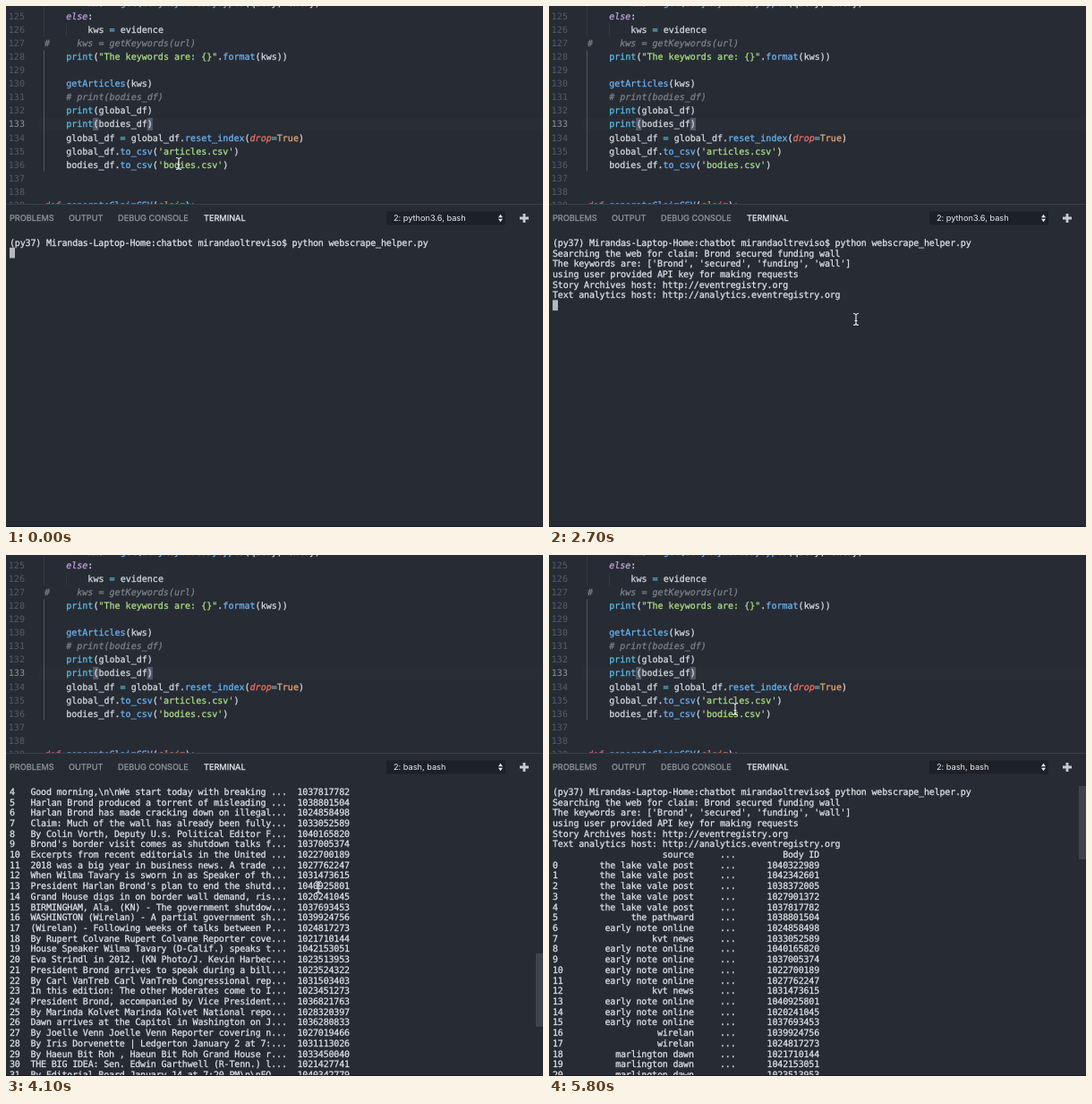
An HTML page that plays this animation: 600 px wide and 582 px high, repeating every 5900 ms.

```html
<!DOCTYPE html>
<html lang="en">
<head>
<meta charset="utf-8">
<title>Terminal session</title>
<style>
html, body { margin: 0; width: 100%; height: 100%; overflow: hidden; background: #272b34; }
svg { display: block; width: 600px; height: 582px; }
text { white-space: pre; text-rendering: geometricPrecision; fill: currentColor; }
tspan { fill: currentColor; stroke: currentColor; }
.mono { font: 10.04px "DejaVu Sans Mono", "Liberation Mono", monospace; }
.bold { stroke: currentColor; stroke-width: 0.25px; }
.term { letter-spacing: -0.195px; color: #e2e4e7; }
.ui { font: 9.2px Inter, Roboto, sans-serif; color: #92979f; }
.bright { color: #eceef0; }
.num { color: #555c69; }
.now { color: #8e949f; }
.k { color: #c3a6de; font-style: italic; }
.d { color: #e0607e; font-style: italic; }
.n { color: #d6dae1; }
.b { color: #57bfe3; }
.f { color: #69b6f5; }
.s { color: #aedf82; }
.o { color: #5cc0cc; }
.c { color: #7d838e; font-style: italic; }
.a { color: #f27464; font-style: italic; }
.t { color: #ecab74; }
</style>
</head>
<body>
<svg id="stage" viewBox="0 0 600 582" xmlns="http://www.w3.org/2000/svg">
  <rect width="600" height="582" fill="#272b34"/>
  <rect x="37" y="124.5" width="563" height="15" fill="#292d36"/>
  <g fill="#515968">
    <rect x="97.2" y="125" width="6.2" height="14"/>
    <rect x="157.7" y="125" width="6.2" height="14"/>
  </g>
  <path d="M42.5 0V34M67.5 19V34" stroke="#323741"/>
  <path d="M42.5 49.5V184.5" stroke="#525965"/>
  <g id="code"></g>
  <rect y="221" width="600" height="361" fill="#272b34"/>
  <rect y="221" width="600" height="1" fill="#3b404a"/>
  <g class="ui bold">
    <text x="4" y="240.4">PROBLEMS</text>
    <text x="70" y="240.4">OUTPUT</text>
    <text x="125" y="240.4">DEBUG CONSOLE</text>
    <text x="221" y="240.4" class="bright">TERMINAL</text>
  </g>
  <rect x="425" y="229.5" width="133" height="15" rx="1" fill="#1d2027"/>
  <text id="shell" class="ui bright" x="433" y="240.4"></text>
  <path d="M550 236.2l2.5-3.4 2.5 3.4zM550 237.8l2.5 3.4 2.5-3.4z" fill="#e4e6ea"/>
  <path d="M574 237H584M579 232V242" stroke="#c8cbd0" stroke-width="2.8"/>
  <rect id="thumb" x="592" width="8" height="82" fill="#3e434d"/>
  <rect id="block" width="6" height="11.7" fill="#b4b7bd"/>
  <g id="rows"></g>
  <rect y="581" width="600" height="1" fill="#1b1e24"/>
  <path id="mouse" d="M-3 -6.5Q-.5 -6.5 0 -5Q.5 -6.5 3 -6.5M0 -5V5M-3 6.5Q-.5 6.5 0 5Q.5 6.5 3 6.5M-1.5 1.5H1.5"
    fill="none" stroke="#eceef0" stroke-width="1.1"/>
</svg>
<script>
const NS = 'http://www.w3.org/2000/svg';
const $ = id => document.getElementById(id);
const LOOP = 5900, STEP = 100;
const CHAR = 5.85, ROW = 11.711, TOP = 258.2, VISIBLE = 28, TRACK = 327;

function add(parent, tag, attrs, text = '') {
  const el = document.createElementNS(NS, tag);
  for (const key in attrs) el.setAttribute(key, attrs[key]);
  el.textContent = text;
  return parent.appendChild(el);
}

// Each line: column, then tokens written as "class|text"
const code = [
  [8, 'n|kws ', 'o|= ', 'f|getQueryKeywordsByTypes', 'n|(query, entry)'],
  [4, 'k|else', 'n|:'],
  [8, 'n|kws ', 'o|= ', 'n|evidence'],
  [0, 'c|#     kws = getKeywords(url)'],
  [4, 'b|print', 'n|(', 's|"The keywords are: {}"', 'n|.', 'f|format', 'n|(kws))'],
  [0],
  [4, 'f|getArticles', 'n|(kws)'],
  [4, 'c|# print(bodies_df)'],
  [4, 'b|print', 'n|(global_df)'],
  [4, 'b|print', 'n|(bodies_df)'],
  [4, 'n|global_df ', 'o|= ', 'n|global_df.', 'f|reset_index', 'n|(', 'a|drop', 'o|=', 't|True', 'n|)'],
  [4, 'n|global_df.', 'f|to_csv', 'n|(', "s|'articles.csv'", 'n|)'],
  [4, 'n|bodies_df.', 'f|to_csv', 'n|(', "s|'bodies.csv'", 'n|)'],
  [0],
  [0],
  [0, 'd|def ', 'f|generateClaimCSV', 'n|(', 'a|claim', 'n|):']
];

code.forEach(([col, ...tokens], i) => {
  const y = 15 + 15.057 * (i - 1), n = 124 + i;
  add($('code'), 'text', { class: n === 133 ? 'mono now' : 'mono num', x: 2.8, y }, String(n));
  const line = add($('code'), 'text', { class: 'mono bold', x: 43 + col * 6.045, y });
  for (const token of tokens) {
    const cut = token.indexOf('|');
    add(line, 'tspan', { class: token.slice(0, cut) }, token.slice(cut + 1));
  }
});

const sources = [
  ['the lake vale post', 5], ['the pathward', 1], ['early note online', 1], ['kvt news', 1],
  ['early note online', 4], ['kvt news', 1], ['early note online', 3], ['wirelan', 2],
  ['marlington dawn', 14], ['qod news', 2], ['the hill square courant', 1],
  ['gadgetloom', 1], ['zpf news', 14]
].flatMap(([name, count]) => Array(count).fill(name));

const articles = String.raw`
1040322989 The shutdown moved into another week as talks ...
1042342601 Lawmakers left the city on Friday without any ...
1038372005 A fight over border money has divided both pa...
1027901372 The president said on Tuesday that he would n...
1037817782 Good morning,\n\nWe start today with breaking ...
1038801504 Harlan Brond produced a torrent of misleading ...
1024858498 Harlan Brond has made cracking down on illegal...
1033052589 Claim: Much of the wall has already been fully...
1040165820 By Colin Vorth, Deputy U.s. Political Editor F...
1037005374 Brond's border visit comes as shutdown talks f...
1022700189 Excerpts from recent editorials in the United ...
1027762247 2018 was a big year in business news. A trade ...
1031473615 When Wilma Tavary is sworn in as Speaker of th...
1040925801 President Harlan Brond's plan to end the shutd...
1020241045 Grand House digs in on border wall demand, ris...
1037693453 BIRMINGHAM, Ala. (KN) - The government shutdow...
1039924756 WASHINGTON (Wirelan) - A partial government sh...
1024817273 (Wirelan) - Following weeks of talks between P...
1021710144 By Rupert Colvane Rupert Colvane Reporter cove...
1042153051 House Speaker Wilma Tavary (D-Calif.) speaks t...
1023513953 Eva Strindl in 2012. (KN Photo/J. Kevin Harbec...
1023524322 President Brond arrives to speak during a bill...
1031503403 By Carl VanTreb Carl VanTreb Congressional rep...
1023451273 In this edition: The other Moderates come to I...
1036821763 President Brond, accompanied by Vice President...
1028320397 By Marinda Kolvet Marinda Kolvet National repo...
1036280833 Dawn arrives at the Capitol in Washington on J...
1027019466 By Joelle Venn Joelle Venn Reporter covering n...
1031113026 By Iris Dorvenette | Ledgerton January 2 at 7:...
1033450040 By Haeun Bit Roh , Haeun Bit Roh Grand House r...
1021427741 THE BIG IDEA: Sen. Edwin Garthwell (R-Tenn.) l...
1040342779 By Editorial Board January 14 at 7:20 PM\n\nFO...
1039707030 Congress returns to Washington for its first f...
1028582445 CHELMSFORD, Mass. -- Army looks for a few good...
1021715152 Dec. 18, 2018 12:53 p.m. ET\n\nOwen Halvenstad...
1029551790 Florida men are seemingly involved in so many ...
1037963060 BIRMINGHAM, Ala. -- The government shutdown ha...
1027591954 Supporters cheer before President Harlan Brond...
1024399717 Troops' departure could hamper relief efforts ...
1032001341 WASHINGTON -- Rep. Wilma Tavary, D-Calif., was...
1039942230 President Harlan Brond boards Sky Guard Two fo...
1024232356 Florida men are seemingly involved in so many ...
1035030436 Early departure could reignite battle over who...
1024839736 The government shutdown fight is increasingly ...
1025289484 The Grand House and senior lawmakers on Sunday...
1024781826 South Carolina Senator Bradley Torven on Frida...
1037899246 BIRMINGHAM, Ala. -- The government shutdown ha...
1038159651 As the U.S. government's partial shutdown stre...
1041093116 President Brond's scheme to hold 800,000 feder...
1038238354 HOUSE VOTES TO REOPEN INTERIOR, EPR: The House...
`.trim().split('\n').map(s => ({ id: s.slice(0, 10), body: s.slice(11) }));

const sourceRow = (index, name, id) =>
  String(index).padEnd(2) + name.padStart(25) + '     ...' + id.padStart(16);
const bodyRow = (index, body, id) =>
  String(index).padEnd(4) + body.padEnd(49) + '  ' + id;

const prompt = '(py37) Mirandas-Laptop-Home:chatbot mirandaoltreviso$ ';
const output = [
  prompt + 'python webscrape_helper.py',
  'Searching the web for claim: Brond secured funding wall',
  "The keywords are: ['Brond', 'secured', 'funding', 'wall']",
  'using user provided API key for making requests',
  'Story Archives host: http://eventregistry.org',
  'Text analytics host: http://analytics.eventregistry.org',
  sourceRow('', 'source', 'Body ID'),
  ...articles.map((a, i) => sourceRow(i, sources[i], a.id)),
  '',
  '[50 rows x 4 columns]',
  bodyRow('', 'articleBody'.padStart(49), '   Body ID'),
  ...articles.map((a, i) => bodyRow(i, a.body, a.id)),
  'Webscraping time--- 1.524015188217163 seconds ---',
  prompt
];

const rows = Array.from({ length: VISIBLE }, (_, i) =>
  add($('rows'), 'text', { class: 'mono bold term', x: 4, y: TOP + 9.6 + i * ROW }));

const DONE = 3000;
const printed = [[0, 1], [1200, 3], [1400, 6], [DONE, output.length]];
const scroll = [
  [3700, 84], [3800, 82], [3900, 78], [4000, 72], [4100, 64], [4200, 48], [4300, 32],
  [4400, 22], [4500, 16], [4700, 13], [4800, 12], [5000, 12], [5100, 9], [5200, 4], [5300, 0]
];
const path = [
  [0, 193, 176], [400, 193, 176], [700, 225, 169], [900, 270, 174], [1200, 322, 268],
  [1500, 338, 333], [1700, 339, 334], [2100, 339, 334], [2700, 343, 350], [3200, 349, 371],
  [5400, 349, 371], [5500, 343, 354], [5600, 308, 288], [5700, 248, 212], [5800, 208, 172]
];

// Linear value of one column of a key list
function at(keys, t, col = 1) {
  const next = keys.findIndex(key => key[0] > t);
  if (next === 0) return keys[0][col];
  if (next < 0) return keys[keys.length - 1][col];
  const a = keys[next - 1], b = keys[next];
  return a[col] + (b[col] - a[col]) * (t - a[0]) / (b[0] - a[0]);
}

function draw(t) {
  const done = t >= DONE;
  const count = printed.filter(key => key[0] <= t).pop()[1];
  const top = done ? Math.round(at(scroll, t)) : 0;
  rows.forEach((row, i) => {
    const n = top + i;
    row.textContent = n < count ? output[n] : '';
  });

  const line = done ? count - 1 : count;
  $('block').setAttribute('x', done ? 4 + prompt.length * CHAR : 4);
  $('block').setAttribute('y', TOP + (line - top) * ROW);
  $('shell').textContent = done ? '2: bash, bash' : '2: python3.6, bash';
  $('thumb').setAttribute('y', 258 + TRACK * top / output.length);
  $('thumb').setAttribute('visibility', done ? 'visible' : 'hidden');
  $('mouse').setAttribute('transform', `translate(${at(path, t, 1)} ${at(path, t, 2)})`);
}

let last = -1;
function tick() {
  const t = Math.floor(performance.now() % LOOP / STEP) * STEP;
  if (t !== last) draw(last = t);
  requestAnimationFrame(tick);
}
tick();
</script>
</body>
</html>
```
